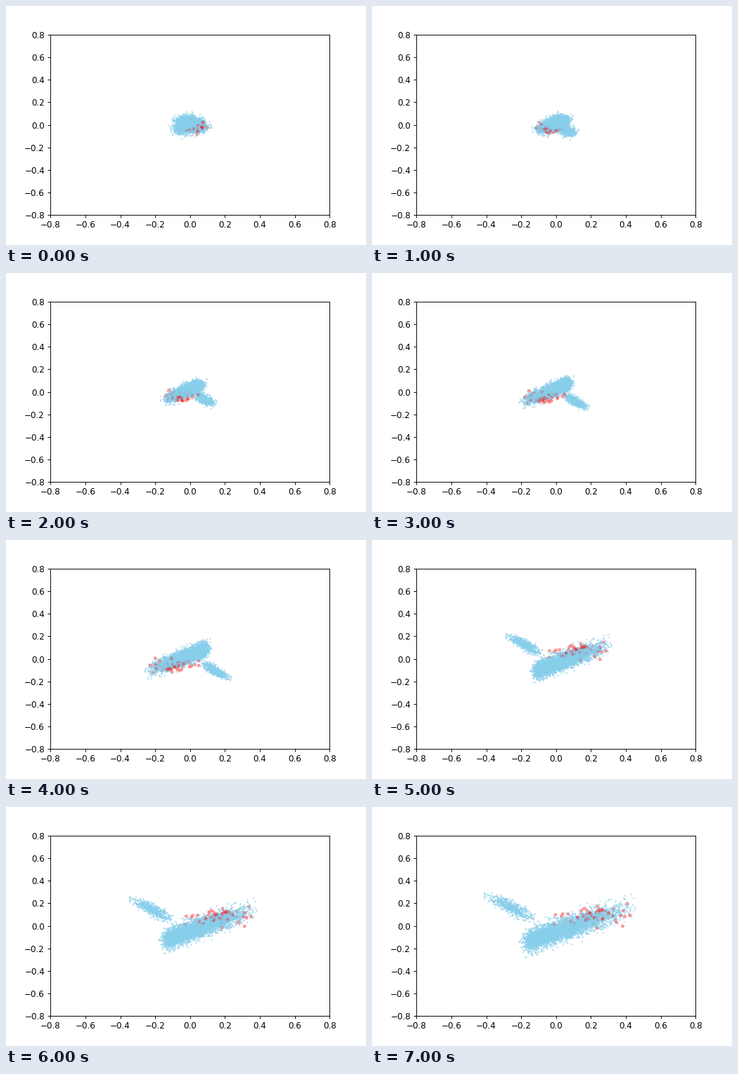
Write a matplotlib script that moves like this. It is 512 px wide and 341 px high and loops after 8000 ms.

```python
import numpy as np
import matplotlib.pyplot as plt
from matplotlib.animation import FuncAnimation

W, H = 512, 341
DPI = W / 6
FRAMES = 8
N_BIG, N_SMALL, N_RED = 4600, 620, 68

rng = np.random.default_rng(7)


def streak(x, center, slope, spread):
    """Points scattered around a straight line through center."""
    cx, cy = center
    y = cy + slope * (x - cx) + rng.normal(0, spread, x.size)
    return np.column_stack([x, y])


def within(p):
    """Keep the points inside the outer limits of the cloud."""
    x, y = p.T
    return p[(x > -0.44) & (x < 0.478) & (y > -0.295) & (y < 0.3)]


big_x = -0.17 + 0.64 * rng.beta(1.25, 2.5, N_BIG) + rng.normal(0, 0.018, N_BIG)
big = streak(big_x, (0, -0.055), 0.5, 0.048)
small = streak(rng.normal(-0.255, 0.066, N_SMALL), (-0.255, 0.162), -0.7, 0.03)
blue = within(np.vstack([big, small]))
red_x = rng.normal(0.2, 0.095, N_RED).clip(-0.02, 0.425)
red = within(streak(red_x, (0.2, 0.085), 0.14, 0.04))

# Both kinds share one random drawing order, so many red points are buried
shape = np.vstack([blue, red])
is_red = np.arange(len(shape)) >= len(blue)
order = rng.permutation(len(shape))
shape, is_red = shape[order], is_red[order]
noise = rng.normal(0, 1, shape.shape).clip(-3.2, 3.2) * (0.028, 0.024)


def positions(i):
    t = i / (FRAMES - 1)
    blue_scale = 0.15 + 0.55 * t + 0.3 * t**2
    red_scale = 0.25 + 0.55 * t + 0.2 * t**2
    red_shift = (1 - t) * (0.02 + 0.13 * t)
    x = np.where(is_red, red_scale * shape[:, 0] - red_shift,
                 blue_scale * shape[:, 0])
    y = (0.21 + 0.72 * t + 0.07 * t**2) * shape[:, 1]
    # The projection axes change sign between steps
    signs = (-1 if 1 <= i < 5 else 1, -1 if i < 5 else 1)
    return (np.column_stack([x, y]) + noise * (1 - t)**2) * signs


fig = plt.figure(figsize=(6, (H + 0.01) / DPI), dpi=DPI, facecolor="white")
ax = fig.add_axes([0.1238, 0.125, 0.775, 0.755])
ticks = np.linspace(-0.8, 0.8, 9)
ax.set(xlim=(-0.8, 0.8), ylim=(-0.8, 0.8), xticks=ticks, yticks=ticks)
ax.xaxis.set_major_formatter("{x:.1f}")
ax.yaxis.set_major_formatter("{x:.1f}")
ax.tick_params(axis="x", pad=2.8)

dots = ax.scatter(*positions(0).T, s=np.where(is_red, 10, 1),
                  c=np.where(is_red, "red", "skyblue"),
                  alpha=np.where(is_red, 0.32, 0.5))


def update(i):
    dots.set_offsets(positions(i))
    return (dots,)


anim = FuncAnimation(fig, update, frames=FRAMES, interval=1000,
                     repeat=True, repeat_delay=0)
plt.show()
```
